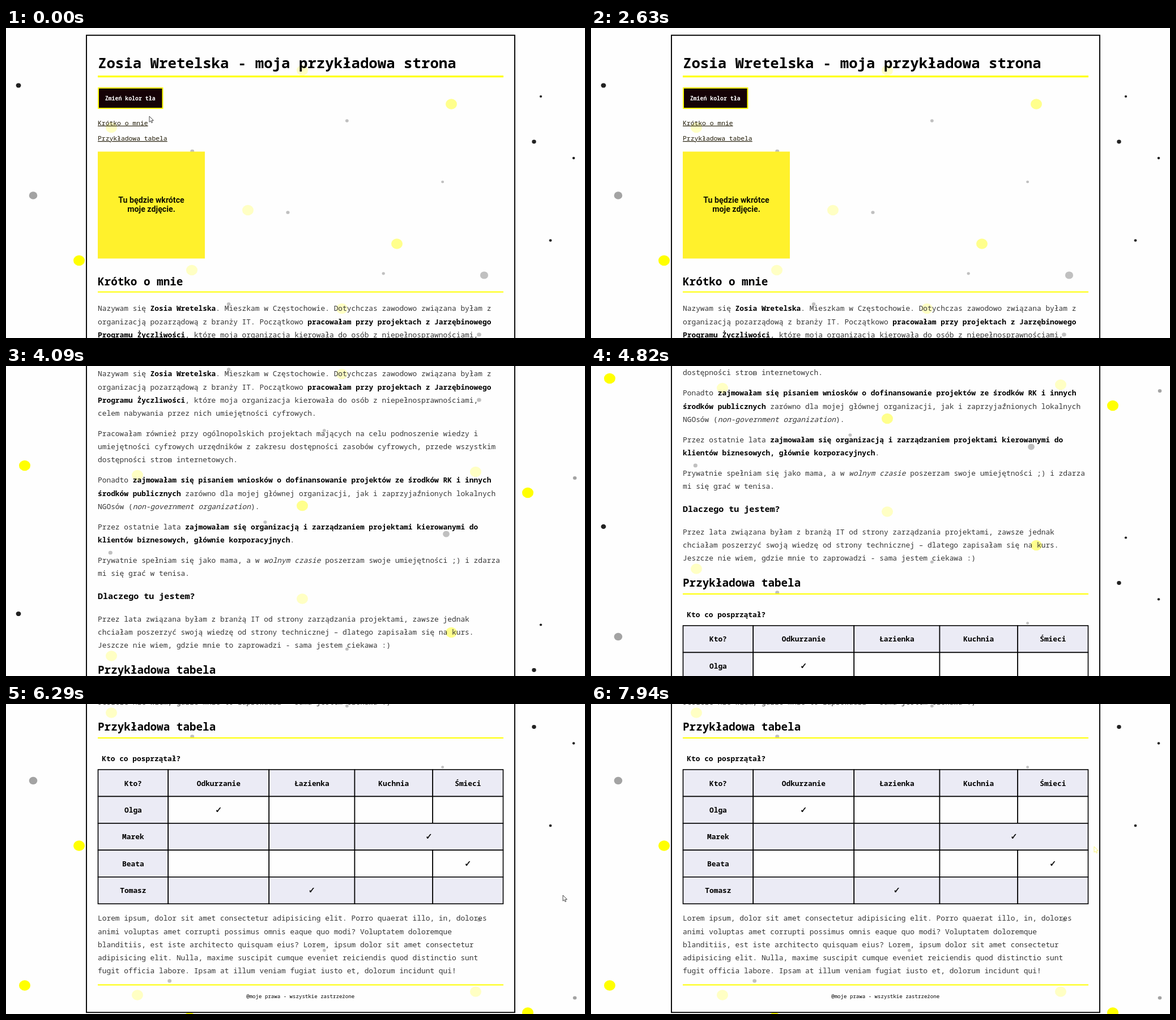
An HTML page that plays this animation: 1022x548 px, repeating every 8270 ms.

```html
<!DOCTYPE html>
<html lang="pl">
<head>
<meta charset="utf-8">
<title>Przykładowa strona</title>
<style>
  html, body { margin: 0; width: 100%; height: 100%; overflow: hidden; background: #fefefe; }
  svg { display: block; width: 100%; height: 100%; }
  text { font: 300 12.87px "Noto Sans Mono", "DejaVu Sans Mono", monospace; fill: #363636; white-space: pre; }
  .bold { font-weight: 700; fill: #000; }
  .italic { font-style: italic; }
  .h1 { font-size: 25.73px; }
  .h2 { font-size: 19.3px; }
  .h3 { font-size: 15.06px; }
  .link { font-size: 11.37px; font-weight: 500; text-decoration: underline; fill: #221c08; }
  .button { font-size: 9.9px; font-weight: 600; fill: #fff; }
  .footer { font-size: 9.1px; font-weight: 500; fill: #000; }
  .photo { font: 700 14.2px Roboto, sans-serif; fill: #110; }
  .tick { font: 14.5px "DejaVu Sans", sans-serif; fill: #000; stroke: #000; stroke-width: .45px; }
  .mid { text-anchor: middle; }
</style>
</head>
<body>
<svg viewBox="0 0 1022 548">
  <g id="page">
    <g id="outer"></g>
    <g id="inner"></g>
    <rect x="142" y="12.8" width="756" height="1511.4" fill="none" stroke="#000" stroke-width="1.9"/>
    <g id="content"></g>
  </g>
  <path id="cursor" d="M0 0v10.2l2.4-2.1 1.5 3.5 1.7-.7-1.5-3.5h3.2z" fill="#fff" stroke-width=".9"/>
</svg>
<script>
const LOOP = 8270, STEP = 70, LEFT = 162, WIDTH = 716, LINE = 23.2, TILE = 818.5;
const el = id => document.getElementById(id);

function add(parent, tag, attrs, text) {
  const node = document.createElementNS('http://www.w3.org/2000/svg', tag);
  for (const key in attrs) node.setAttribute(key, attrs[key]);
  if (text) node.textContent = text;
  parent.append(node);
  return node;
}
const content = el('content');
const box = (x, y, width, height, fill, more) => add(content, 'rect', { x, y, width, height, fill, ...more });
const rule = (y, h) => box(LEFT, y - h / 2, WIDTH, h, '#ff0');
const label = (x, y, text, cls) => add(content, 'text', { x, y, class: cls }, text);

// *bold* and _italic_ inside a line
function rich(y, line) {
  const node = label(LEFT, y);
  line.split(/(\*[^*]+\*|_[^_]+_)/).filter(Boolean).forEach(part => {
    const cls = { '*': 'bold', '_': 'italic' }[part[0]];
    add(node, 'tspan', cls ? { class: cls } : {}, cls ? part.slice(1, -1) : part);
  });
}
// Lines flow down from y; an empty line is a paragraph gap
function flow(y, text) {
  for (const line of text.trim().split('\n')) {
    if (line) rich(y, line);
    y += line ? LINE : 12.8;
  }
}

// Background dots, repeated down the page and dimmed behind the article
function dot(x, y, r, outerFill, innerFill = '#c0c0c0') {
  const inside = x > 142 && x < 898;
  for (const cy of [y, y + TILE]) {
    if (inside && cy > 1514) continue;
    add(el(inside ? 'inner' : 'outer'), 'ellipse',
      { cx: x, cy, rx: r, ry: r * .93, fill: inside ? innerFill : outerFill });
  }
}
const yellow = (x, y, vivid) => dot(x, y, 10, '#ff0', vivid ? '#ffff8c' : '#ffffc4');
for (const [x, y, vivid] of [[33, 658], [232, 675], [427, 322], [690, 381.5, true]]) {
  yellow(x, y, vivid);
  yellow(x + 96, y - 247, vivid);
}
[[186, 176], [593, 496], [829, 669], [523, 729, true], [921, 706]].forEach(p => yellow(...p));
[[22, 101.5, 4.4], [944, 121, 2.2], [932, 201, 3.7], [1002, 230, 2.3], [961, 375.5, 2.4]]
  .forEach(p => dot(...p, '#222'));
[[48, 296, 7.3], [844, 437, 7.1], [777, 779, 5.9], [1004, 680, 3.3]].forEach(p => dot(...p, '#a3a3a3'));
for (let i = 1; i <= 13; i++) {
  dot(160 + i * .618 % 1 * 715, 110 + i * 54, 2.3 + i * .37 % 1 * 1.6);
}
add(el('outer'), 'ellipse', { cx: 324, cy: 1533, rx: 10, ry: 9, fill: '#ff0' });

// Top of the page
label(LEFT, 71, 'Zosia Wretelska - moja przykładowa strona', 'h1 bold');
rule(85.7, 3.2);
const button = box(163, 106, 113.5, 36, '#150206', { stroke: '#ff0', 'stroke-width': 2 });
label(174.7, 127.6, 'Zmień kolor tła', 'button');
label(LEFT, 171.7, 'Krótko o mnie', 'link');
label(LEFT, 199, 'Przykładowa tabela', 'link');
box(LEFT, 218.5, 189, 189, '#fff12c');
label(256.5, 308.8, 'Tu będzie wkrótce', 'photo mid');
label(256.5, 325.3, 'moje zdjęcie.', 'photo mid');

// About
label(LEFT, 455, 'Krótko o mnie', 'h2 bold');
rule(466.6, 2);
flow(500.4, `
Nazywam się *Zosia Wretelska*. Mieszkam w Częstochowie. Dotychczas zawodowo związana byłam z
organizacją pozarządową z branży IT. Początkowo *pracowałam przy projektach z Jarzębinowego*
*Programu Życzliwości*, które moja organizacja kierowała do osób z niepełnosprawnościami,
celem nabywania przez nich umiejętności cyfrowych.

Pracowałam również przy ogólnopolskich projektach mających na celu podnoszenie wiedzy i
umiejętności cyfrowych urzędników z zakresu dostępności zasobów cyfrowych, przede wszystkim
dostępności stron internetowych.

Ponadto *zajmowałam się pisaniem wniosków o dofinansowanie projektów ze środków RK i innych*
*środków publicznych* zarówno dla mojej głównej organizacji, jak i zaprzyjaźnionych lokalnych
NGOsów (_non-government organization_).

Przez ostatnie lata *zajmowałam się organizacją i zarządzaniem projektami kierowanymi do*
*klientów biznesowych, głównie korporacyjnych*.

Prywatnie spełniam się jako mama, a w _wolnym czasie_ poszerzam swoje umiejętności ;) i zdarza
mi się grać w tenisa.`);
label(LEFT, 894, 'Dlaczego tu jestem?', 'h3 bold');
flow(934, `
Przez lata związana byłam z branżą IT od strony zarządzania projektami, zawsze jednak
chciałam poszerzyć swoją wiedzę od strony technicznej – dlatego zapisałam się na kurs.
Jeszcze nie wiem, gdzie mnie to zaprowadzi - sama jestem ciekawa :)`);

// Table
label(LEFT, 1026.3, 'Przykładowa tabela', 'h2 bold');
rule(1039, 2);
label(169.3, 1080, 'Kto co posprzątał?', 'bold');
const cols = [162.5, 286.3, 464.3, 615.5, 753.2, 877.5], TOP = 1095, ROW = 47.45;
const heads = ['Kto?', 'Odkurzanie', 'Łazienka', 'Kuchnia', 'Śmieci'];
const people = [['Olga', 1], ['Marek', 3], ['Beata', 4], ['Tomasz', 2]];
const LILAC = '#ebebf5';
function cell(row, from, to, fill, text, cls) {
  const x = cols[from], w = cols[to] - x, y = TOP + row * ROW;
  const rect = box(x, y, w, ROW, fill, { stroke: '#000', 'stroke-width': 1.6 });
  if (text) label(x + w / 2, y + ROW / 2 + 4.8, text, cls + ' mid');
  return rect;
}
heads.forEach((text, i) => cell(0, i, i + 1, LILAC, text, 'bold'));
const rows = people.map(([name, done], i) => {
  const fill = i % 2 ? LILAC : '#fefefe', cells = [];
  cell(i + 1, 0, 1, LILAC, name, 'bold');
  for (let c = 1, to; c < 5; c = to) {
    to = i === 1 && c === 3 ? 5 : c + 1;
    cells.push(cell(i + 1, c, to, fill, c === done ? '✓' : '', 'tick'));
  }
  return { fill, cells };
});
flow(1362.4, `
Lorem ipsum, dolor sit amet consectetur adipisicing elit. Porro quaerat illo, in, dolores
animi voluptas amet corrupti possimus omnis eaque quo modi? Voluptatem doloremque
blanditiis, est iste architecto quisquam eius? Lorem, ipsum dolor sit amet consectetur
adipisicing elit. Nulla, maxime suscipit cumque eveniet reiciendis quod distinctio sunt
fugit officia labore. Ipsam at illum veniam fugiat iusto et, dolorum incidunt qui!`);
rule(1475.5, 2);
label(519.7, 1499.3, '@moje prawa - wszystkie zastrzeżone', 'footer mid');

const runs = [[80, 880], [2420, 2630], [3560, 4090], [4680, 5300], [6290, 7070], [7140, 7940]];
const scrollKeys = [[0, 0], [3490, 0], [3759, 304.6], [4090, 482], [4610, 482],
  [4818, 636.2], [5093, 822.1], [5300, 979]];
const cursorKeys = [[0, 253, 156], [880, 256, 121], [2350, 256, 121], [2560, 966, 176],
  [6289, 983, 338], [6290, 983, 338], [7070, 735, 136], [7740, 735, 485], [7850, 970, 400], [7940, 888, 252]];

function snap(t) {
  const run = runs.filter(r => r[0] <= t).pop();
  if (!run) return 0;
  const [start, end] = run, size = (end - start) / Math.round((end - start) / STEP);
  return Math.min(end, start + Math.floor((t - start) / size + 1e-6) * size);
}
function sample(keys, t) {
  const next = keys.findIndex(k => k[0] > t);
  if (next < 0) return keys[keys.length - 1].slice(1);
  const a = keys[next - 1], b = keys[next], u = (t - a[0]) / (b[0] - a[0]);
  return a.slice(1).map((v, i) => v + (b[i + 1] - v) * u);
}

function draw(now) {
  const time = now % LOOP, t = snap(time);
  const [scroll] = sample(scrollKeys, t), [x, y] = sample(cursorKeys, t);
  const shown = t < 2629 || t >= 6290;
  el('page').setAttribute('transform', `translate(0 ${-scroll})`);
  el('inner').style.display = time >= 1080 && time < 2090 ? 'none' : '';
  const cursor = el('cursor');
  cursor.style.display = shown ? '' : 'none';
  cursor.setAttribute('transform', `translate(${x} ${y})`);
  cursor.setAttribute('stroke', t > 7100 ? '#f6f26a' : '#333');

  const pageY = y + scroll;
  const overButton = shown && x > 162 && x < 277 && pageY > 105 && pageY < 143;
  button.setAttribute('fill', overButton ? '#3a3030' : '#150206');
  const hovered = shown && x > 162 && x < 877 ? Math.floor((pageY - TOP) / ROW) - 1 : -1;
  rows.forEach((row, i) => row.cells.forEach(c => c.setAttribute('fill', i === hovered ? '#ff0' : row.fill)));
}
const began = performance.now();
function tick() {
  draw(performance.now() - began);
  requestAnimationFrame(tick);
}
tick();
</script>
</body>
</html>
```
